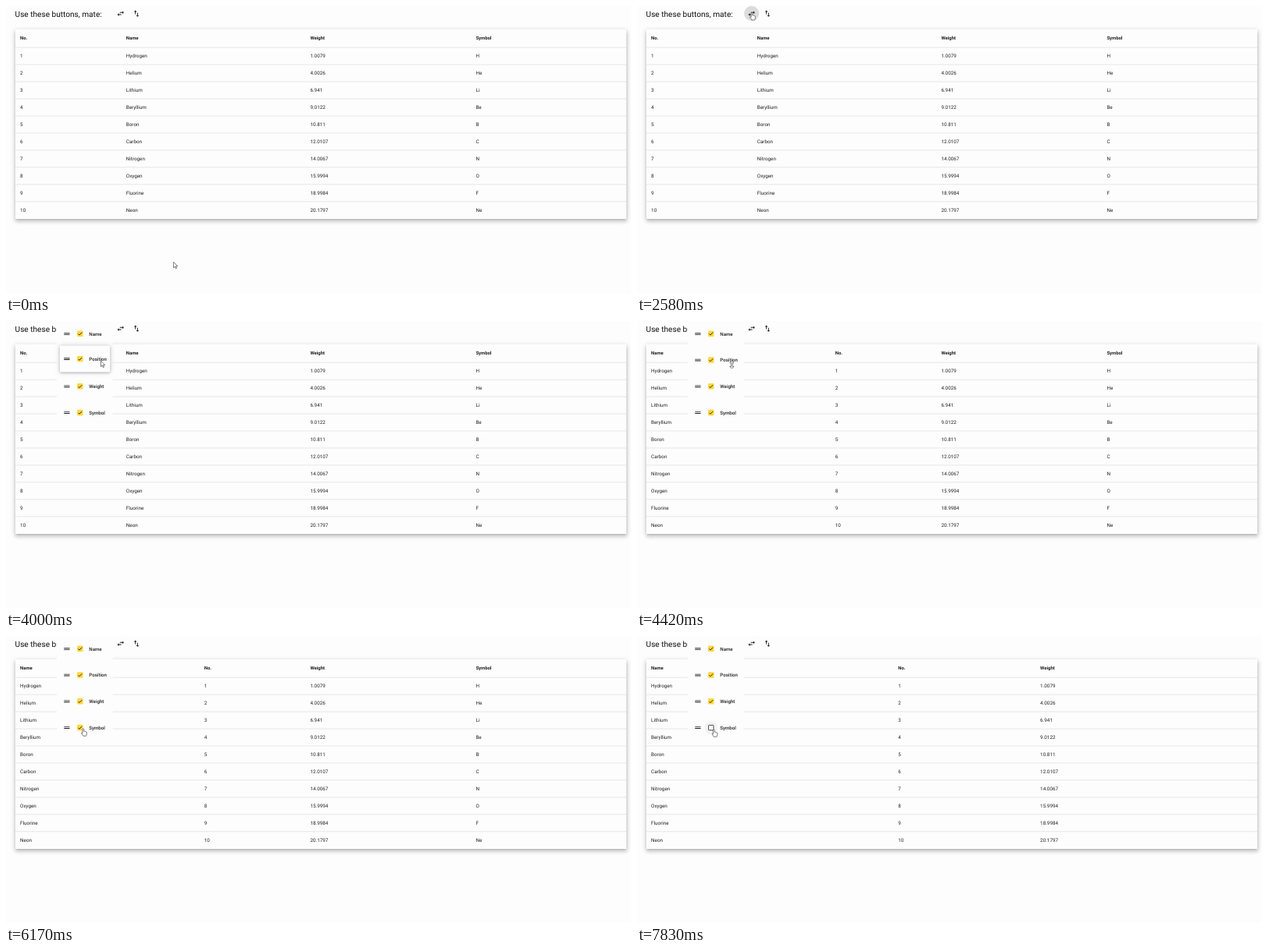
These frames come from a looping animation (800 px wide and 368 px high, 8 s). An HTML page:

```html
<!DOCTYPE html>
<html lang="en">
<head>
<meta charset="utf-8">
<title>Column picker</title>
<style>
  html, body { margin: 0; width: 100%; height: 100%; overflow: hidden; background: #fdfdfd; }
  .card {
    position: absolute; left: 12px; top: 29.5px; width: 782px; height: 243px; background: #fdfdfd;
    box-shadow: 0 2.3px 2.3px -1.4px rgba(0,0,0,.2), 0 3.7px 4.6px .5px rgba(0,0,0,.14), 0 1.4px 6.4px .9px rgba(0,0,0,.12);
  }
  svg { position: absolute; left: 0; top: 0; display: block; }
  text { font-family: Roboto, sans-serif; font-size: 6.3px; fill: #212121; text-rendering: geometricPrecision; }
  .title { font-size: 10.1px; fill: #111; }
  .head { font-size: 5.95px; font-weight: 600; }
  .label { font-size: 6.15px; font-weight: 500; }
  .pointer { fill: #fff; stroke: #444; stroke-width: .7; stroke-linejoin: round; }
  .lift { filter: drop-shadow(0 1.6px 1.6px rgba(0,0,0,.24)) drop-shadow(0 .8px 3px rgba(0,0,0,.16)); }
</style>
</head>
<body>
<div class="card"></div>
<svg id="stage" width="800" height="368" viewBox="0 0 800 368"></svg>
<script>
const LOOP = 8000, FPS = 12;
const PAPER = '#fdfdfd';
const stage = document.getElementById('stage');

function el(parent, tag, attrs, text) {
  const node = document.createElementNS('http://www.w3.org/2000/svg', tag);
  for (const key in attrs) node.setAttribute(key, attrs[key]);
  if (text) node.textContent = text;
  parent.appendChild(node);
  return node;
}
const place = (node, x, y) => node.setAttribute('transform', `translate(${x} ${y})`);
const show = (node, on) => node.setAttribute('visibility', on ? 'visible' : 'hidden');

// A 24-unit icon centred on (x, y)
function icon(parent, x, y, d) {
  el(parent, 'path', { d, fill: '#1c1c1c', transform: `translate(${x} ${y}) scale(.4583) translate(-12 -12)` });
}

// Linear value between [step, ...values] keys
function track(keys, step) {
  let i = 0;
  while (i < keys.length - 1 && keys[i + 1][0] <= step) i++;
  const a = keys[i], b = keys[i + 1] || a;
  const p = b === a ? 0 : Math.max(0, (step - a[0]) / (b[0] - a[0]));
  return a.map((v, n) => typeof v === 'number' ? v + (b[n] - v) * p : v);
}

// Table
const names = 'Hydrogen Helium Lithium Beryllium Boron Carbon Nitrogen Oxygen Fluorine Neon'.split(' ');
const columns = {
  no: ['No.', ...names.map((_, i) => String(i + 1))],
  name: ['Name', ...names],
  weight: ['Weight', ...'1.0079 4.0026 6.941 9.0122 10.811 12.0107 14.0067 15.9994 18.9984 20.1797'.split(' ')],
  symbol: ['Symbol', ...'H He Li Be B C N O F Ne'.split(' ')]
};
const layouts = [
  { no: 18.1, name: 153.8, weight: 389.4, symbol: 601.4 },
  { name: 18.1, no: 253.8, weight: 389.4, symbol: 601.4 },
  { name: 18.1, no: 334.2, weight: 516.1 }
];

el(stage, 'text', { class: 'title', x: 11.6, y: 13.5 }, 'Use these buttons, mate:');
for (let i = 0; i < 10; i++) {
  el(stage, 'rect', { x: 12, y: 52.8 + i * 21.97, width: 782, height: .6, fill: '#d6d6d6' });
}
const columnNodes = {};
for (const key in columns) {
  const g = columnNodes[key] = el(stage, 'g', {});
  columns[key].forEach((text, i) => {
    el(g, 'text', i ? { x: 0, y: 66.2 + (i - 1) * 21.97 } : { class: 'head', x: 0, y: 43.4 }, text);
  });
}

// Toolbar buttons
const ripple = el(stage, 'circle', { cx: 146.7, cy: 9.5, r: 9.6, fill: '#000' });
icon(stage, 146.7, 9.7, 'M6.99 11L3 15l3.99 4v-3H14v-2H6.99v-3zM21 9l-3.99-4v3H10v2h7.01v3L21 9z');
icon(stage, 167, 9.7, 'M16 17.01V10h-2v7.01h-3L15 21l4-3.99h-3zM9 3L5 6.99h3V14h2V6.99h3L9 3z');

// Menu
const menu = el(stage, 'g', {});
el(menu, 'rect', { x: 65, y: -1, width: 71.5, height: 135.5, fill: PAPER });
const rowY = i => 16.3 + i * 33.75;

function menuItem(label) {
  const g = el(menu, 'g', {});
  const back = el(g, 'rect', { class: 'lift', x: 68.8, y: -17, width: 64.4, height: 34, rx: 1, fill: PAPER });
  icon(g, 77.9, 0, 'M20 9H4v2h16V9zM4 15h16v-2H4v2z');
  const halo = el(g, 'circle', { cx: 94.8, cy: 0, r: 8.6, fill: '#000', opacity: 0 });
  const empty = el(g, 'rect', { x: 91.6, y: -3.2, width: 6.4, height: 6.4, rx: .5, fill: PAPER, stroke: '#4a4a4a', 'stroke-width': 1 });
  const full = el(g, 'g', {});
  el(full, 'rect', { x: 91.1, y: -3.7, width: 7.4, height: 7.4, rx: .7, fill: '#ffd740' });
  el(full, 'path', { d: 'M92.4 .2L93.9 1.7L97.3-1.7', fill: 'none', stroke: '#222', 'stroke-width': .95 });
  el(g, 'text', { class: 'label', x: 106.3, y: 2.2 }, label);
  return { g, back, halo, empty, full };
}
const nameItem = menuItem('Name');
const weightItem = menuItem('Weight');
const symbolItem = menuItem('Symbol');
const positionItem = menuItem('Position');
for (const item of [nameItem, weightItem, symbolItem, positionItem]) {
  show(item.back, false);
  show(item.empty, false);
}
place(weightItem.g, 0, rowY(2));
place(symbolItem.g, 0, rowY(3));

// Pointer shapes
const shapes = {
  arrow: 'M0 0V7.5L1.8 5.9L3 8.6L4.2 8L3 5.4H5.3Z',
  hand: 'M-.9 .8C-.9-.3 .8-.3 .8 .8V3.4Q1.4 2.9 2 3.6Q2.8 3.2 3.3 4Q4.4 3.8 4.4 5V7Q4.2 8.4 3.6 9.4H-.1Q-.6 8.2-2.2 6.2Q-2.6 5.1-1.5 5.2L-.9 5.8Z',
  resize: 'M0-5L2.6-2.3H.9V2.3H2.6L0 5L-2.6 2.3H-.9V-2.3H-2.6Z'
};
const pointer = el(stage, 'path', { class: 'pointer' });
const path = [
  [0, 214.4, 328.2, 'arrow'], [2, 207.4, 307.5, 'arrow'], [5, 207.4, 307.5, 'arrow'],
  [6, 212.3, 301.3, 'arrow'], [9, 212.3, 301.3, 'arrow'], [11, 178, 175, 'arrow'],
  [13, 112, 38, 'arrow'], [14, 103, 6, 'arrow'], [15, 126, 1, 'arrow'],
  [16, 147, 8.6, 'hand'], [35, 147, 8.6, 'hand'], [36, 143, 11, 'arrow'],
  [38, 129, 18, 'resize'], [40, 124, 23, 'resize'], [41, 124, 23, 'resize'],
  [44, 123.2, 25.6, 'resize'], [45, 122.2, 19, 'resize'], [46, 121.6, 24, 'arrow'],
  [48, 121.4, 51, 'arrow'], [50, 121.4, 59.5, 'arrow'], [51, 121.4, 57, 'arrow'],
  [52, 121.4, 56, 'resize'], [57, 121.4, 56, 'resize'], [59, 106, 52, 'resize'],
  [60, 99.6, 50.8, 'hand'], [61, 99.4, 46, 'hand'], [63, 98.8, 17, 'hand'],
  [65, 98.8, 17, 'hand'], [67, 99, 50.5, 'hand'], [74, 98.9, 118.8, 'hand'],
  [76, 98.4, 119.8, 'hand']
];
const dragY = [[45, rowY(0)], [46, 21], [48, 48.6], [50, 58], [51, 54], [52, rowY(1)]];
const shiftY = [[46, rowY(1)], [48, rowY(0)]];

function draw(step) {
  const layout = layouts[step < 52 ? 0 : step < 78 ? 1 : 2];
  for (const key in columnNodes) {
    show(columnNodes[key], key in layout);
    if (key in layout) place(columnNodes[key], layout[key], 0);
  }

  ripple.setAttribute('opacity', track([[30, 0], [31, .13], [33, .13], [36, 0]], step)[1]);
  menu.setAttribute('opacity', track([[31, 0], [33, 1]], step)[1]);

  place(positionItem.g, 0, track(dragY, step)[1]);
  place(nameItem.g, 0, track(shiftY, step)[1]);
  positionItem.back.setAttribute('visibility', step >= 46 && step < 52 ? 'inherit' : 'hidden');

  const off = step >= 78;
  symbolItem.full.setAttribute('visibility', off ? 'hidden' : 'inherit');
  symbolItem.empty.setAttribute('visibility', off ? 'inherit' : 'hidden');
  symbolItem.halo.setAttribute('opacity', track([[77, 0], [79, .11], [82, .11], [86, .04]], step)[1]);

  const [, x, y, shape] = track(path, step);
  pointer.setAttribute('d', shapes[shape]);
  place(pointer, x, y);
}

function tick() {
  const time = performance.now() % LOOP;
  draw(Math.floor((time + 4) * FPS / 1000) % (LOOP * FPS / 1000));
  requestAnimationFrame(tick);
}
draw(0);
requestAnimationFrame(tick);
</script>
</body>
</html>
```
